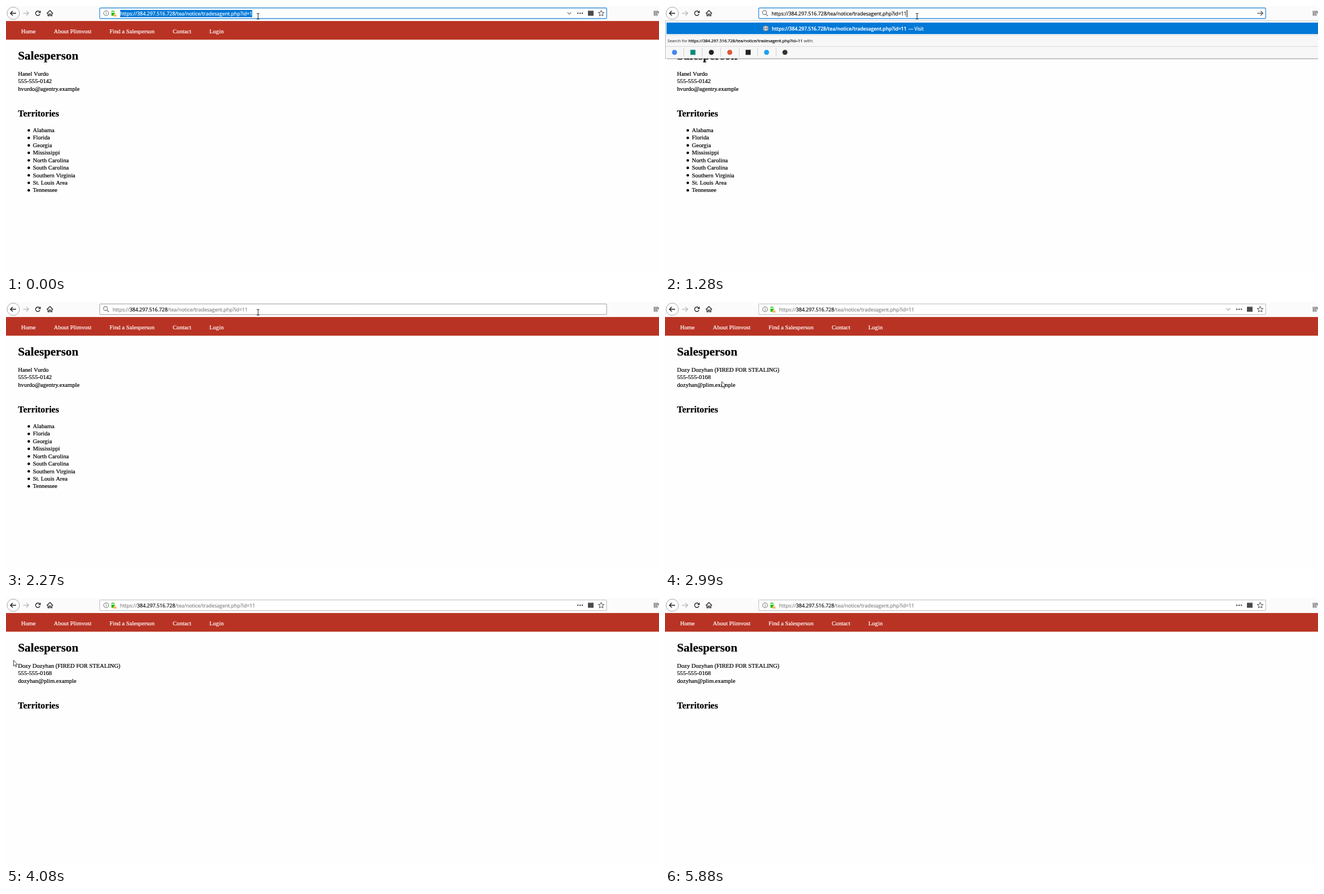
An HTML page with a canvas for the animation above (6.31 s loop, 1167 px wide and 480 px high).

```html
<!DOCTYPE html>
<html lang="en">
<head>
<meta charset="utf-8">
<title>Salesperson page</title>
<style>
html, body { margin: 0; width: 100%; height: 100%; overflow: hidden; background: #fefefe; }
canvas { display: block; width: 1167px; height: 480px; }
</style>
</head>
<body>
<canvas id="stage" width="1167" height="480"></canvas>
<script>
const ctx = document.getElementById('stage').getContext('2d');
const LOOP = 6310;
const SERIF = '"Liberation Serif", serif';
const SANS = '"Open Sans", "Noto Sans", sans-serif';
const BLUE = '#0078d7', INK = '#0c0c0d', GRAY = '#858585', ICON = '#4a4a4f';
const SCHEME = 'https://', HOST = '384.297.516.728', PATH = '/tea/notice/tradesagent.php?id=';
const URL_FONT = `8.9px ${SANS}`;

const NAV = [['Home', 27], ['About Plimvost', 85.5], ['Find a Salesperson', 185], ['Contact', 298], ['Login', 363.5]];
const TERRITORIES = ['Alabama', 'Florida', 'Georgia', 'Mississippi', 'North Carolina',
  'South Carolina', 'Southern Virginia', 'St. Louis Area', 'Tennessee'];
const BEFORE = { lines: ['Hanel Vurdo', '555-555-0142', 'hvurdo@agentry.example'], list: TERRITORIES };
const AFTER = { lines: ['Dozy Dozyhan (FIRED FOR STEALING)', '555-555-0168', 'dozyhan@plim.example'], list: [] };

// Pointer track: start time, shape, x, y (arrow: tip, beam: top centre).
const POINTER = [
  [0, 'beam', 450.5, 13], [2990, 'arrow', 101, 142], [3110, 'beam', 101.5, 143], [3240, 'beam', 100.5, 144],
  [3380, 'beam', 66.5, 139], [3500, 'beam', 23.5, 122], [3630, 'beam', 124.5, 130], [3780, 'beam', 26.5, 126],
  [3920, 'beam', 80.5, 118], [4080, 'arrow', 13, 111], [4200, 'arrow', 95, 137], [4340, 'beam', 97.5, 80],
  [4470, 'arrow', 93, 174], [4890, 'arrow', 261, 201], [5030, 'arrow', 841, 335],
  [5340, 'arrow', 1053, 453], [5610, 'arrow', 1070, 463], [5740, 'arrow', 1080, 468], [5880, 'none', 0, 0]
];

function box(x, y, w, h, color) {
  ctx.fillStyle = color;
  ctx.fillRect(x, y, w, h);
}

// A hairline outline gives small text the weight of desktop rendering.
function write(str, x, y, font, color = '#000') {
  ctx.font = font;
  ctx.fillStyle = ctx.strokeStyle = color;
  ctx.lineWidth = 0.22;
  ctx.fillText(str, x, y);
  ctx.strokeText(str, x, y);
  return x + ctx.measureText(str).width;
}

function trace(points, closed) {
  ctx.beginPath();
  points.forEach(([x, y]) => ctx.lineTo(x, y));
  if (closed) ctx.closePath();
}

function line(points, color = ICON, width = 1.2, closed = false) {
  trace(points, closed);
  ctx.strokeStyle = color;
  ctx.lineWidth = width;
  ctx.stroke();
}

function fill(points, color) {
  trace(points, true);
  ctx.fillStyle = color;
  ctx.fill();
}

function disc(x, y, r, color) {
  ctx.beginPath();
  ctx.arc(x, y, r, 0, 7);
  ctx.fillStyle = color;
  ctx.fill();
}

function ring(x, y, r, color = ICON, width = 1, from = 0, to = Math.PI * 2) {
  ctx.beginPath();
  ctx.arc(x, y, r, from, to);
  ctx.strokeStyle = color;
  ctx.lineWidth = width;
  ctx.stroke();
}

function arrowIcon(x, y, dir, color = ICON, width = 1.3) {
  line([[x - 5 * dir, y], [x + 5 * dir, y]], color, width);
  line([[x + dir, y - 4], [x + 5 * dir, y], [x + dir, y + 4]], color, width);
}

function drawPage({ lines, list }) {
  box(0, 0, 1167, 480, '#fefefe');
  box(0, 26.67, 1167, 33.67, '#b93324');
  const body = `10.67px ${SERIF}`;
  NAV.forEach(([label, x]) => write(label, x, 49, body, '#fff'));
  write('Salesperson', 21.5, 95.6, `bold 21.33px ${SERIF}`);
  lines.forEach((s, i) => write(s, 21.5, 125 + i * 13.4, body));
  write('Territories', 21.5, 197.6, `bold 16px ${SERIF}`);
  list.forEach((s, i) => {
    const y = 226 + i * 13.42;
    disc(40.7, y - 3.2, 2.3, '#000');
    write(s, 48, y, body);
  });
}

function drawToolbar() {
  box(0, 0, 1167, 26.67, '#fbfbfb');
  disc(13, 13, 11, '#fff');
  ring(13, 13, 11, '#a6a6a6');
  arrowIcon(13, 13, -1, '#1c1c1f', 1.5);
  arrowIcon(35.5, 13, 1, '#b4b4b6');
  ring(57, 13, 4, '#2a2a2e', 1.5, 0.4, 5.5);
  fill([[62, 8], [62, 12.5], [57.5, 12.5]], '#2a2a2e');
  line([[73, 13.5], [78.5, 8], [84, 13.5]], '#2a2a2e', 1.4);
  line([[75, 12.5], [75, 17.5], [77.3, 17.5], [77.3, 14.5], [79.7, 14.5], [79.7, 17.5], [82, 17.5], [82, 12.5]], '#2a2a2e', 1.3);
  [1158.5, 1161, 1163.5].forEach(x => line([[x, 8.5], [x, 17.5]], ICON, 1.2));
  line([[1165, 9], [1169, 17.5]], ICON, 1.2);
}

function siteIcons() {
  ring(179, 13, 4.4, '#6a6a6d');
  box(178.5, 12.2, 1, 3.3, '#6a6a6d');
  box(178.5, 10.2, 1, 1.1, '#6a6a6d');
  ring(191.2, 11, 2.2, '#12bc00', 1.3, Math.PI, Math.PI * 2);
  box(188.5, 12, 6.5, 5.5, '#12bc00');
  fill([[194.5, 12], [198.5, 18.7], [190.5, 18.7]], '#fff');
  fill([[194.5, 13], [198, 18.4], [191, 18.4]], '#f5a02a');
  box(194, 14.8, 1, 2, '#fff');
}

function searchIcon() {
  ring(177.8, 11.8, 3.6, '#77777a', 1.2);
  line([[180.4, 14.4], [184, 18]], '#77777a', 1.4);
}

function actionIcons() {
  [1022, 1026, 1030].forEach(x => disc(x, 13, 1.3, ICON));
  box(1040, 8.5, 10, 9, ICON);
  const star = Array.from({ length: 10 }, (_, i) => {
    const a = -Math.PI / 2 + i * Math.PI / 5, r = i % 2 ? 2.5 : 5.6;
    return [1063.7 + r * Math.cos(a), 13.3 + r * Math.sin(a)];
  });
  line(star, ICON, 1, true);
}

function chevron(alpha) {
  ctx.globalAlpha = alpha;
  line([[1003.3, 11.3], [1006.7, 14.7], [1010, 11.3]], '#5a5a5d', 1.1);
  ctx.globalAlpha = 1;
}

function drawField(t) {
  const focused = t < 2270;
  const edge = focused ? '#2f8fda' : t < 2990 ? '#a0a0a0' : '#bdbdbd';
  ctx.beginPath();
  ctx.roundRect(167.5, 3.5, 906, 19, 1.5);
  ctx.fillStyle = '#fff';
  ctx.fill();
  ctx.strokeStyle = edge;
  ctx.lineWidth = focused ? 1.3 : 1;
  ctx.stroke();

  const searching = t >= 1280 && t < 2410;
  const x = searching ? 190.5 : 204;
  if (searching) searchIcon();
  else { siteIcons(); actionIcons(); }
  drawAddress(t, x);

  if (t < 1030) chevron(0.9);
  else if (t < 1280) arrowIcon(1006.5, 13, 1);
  else if (t < 2270) arrowIcon(1063.5, 13, 1);
  else if (t >= 2410 && t < 3240) chevron(t < 2990 ? 0.9 : t < 3110 ? 0.6 : 0.3);
}

function drawAddress(t, x) {
  const base = 16.8;
  const id = t < 1280 ? '1' : '11';
  if (t >= 2270) {
    x = write(SCHEME, x, base, URL_FONT, GRAY);
    x = write(HOST, x, base, URL_FONT, INK);
    write(PATH + id, x, base, URL_FONT, GRAY);
    return;
  }
  const stem = SCHEME + HOST + PATH;
  ctx.font = URL_FONT;
  const mid = x + ctx.measureText(stem).width;
  const end = mid + ctx.measureText(id).width;
  if (t < 1030) {
    const from = t < 310 ? x : Math.round(mid);
    box(from, 7, Math.round(end) - from, 13, BLUE);
  }
  write(stem, x, base, URL_FONT, t < 310 ? '#fff' : INK);
  write(id, mid, base, URL_FONT, t < 1030 ? '#fff' : INK);
  if (t >= 1030 && (t < 1550 || t >= 1990)) box(Math.round(end), 7, 1, 13, '#000');
}

function drawDropdown() {
  const address = SCHEME + HOST + PATH + '11';
  const shade = ctx.createLinearGradient(0, 94, 0, 96);
  shade.addColorStop(0, 'rgba(0,0,0,.35)');
  shade.addColorStop(1, 'rgba(0,0,0,0)');
  box(4, 94, 1163, 2, shade);
  box(0, 26, 1167, 68, '#fcfcfc');
  box(0, 26, 1167, 1, '#c8c8c8');
  box(0, 26, 1, 68, '#b8b8b8');
  box(0, 93.5, 1167, 0.8, '#a0a0a0');
  box(2.67, 29.67, 1164.33, 20.67, BLUE);
  box(1, 52, 1166, 41.5, '#f7f7f7');
  box(1, 52, 1166, 1, '#e0e0e0');
  box(1, 72, 1166, 1, '#d8d8d8');

  disc(180, 40, 5.3, '#dde6ee');
  ring(180, 40, 4.9, '#55636f');
  line([[175.5, 40], [184.5, 40]], '#55636f', 0.8);
  ctx.beginPath();
  ctx.ellipse(180, 40, 2.2, 4.8, 0, 0, 7);
  ctx.stroke();

  const end = write(address, 191, 43.8, `600 8.6px ${SANS}`, '#fff');
  write('— Visit', end + 3.5, 43.8, `8.5px ${SANS}`, '#fff');

  const small = `7.5px ${SANS}`;
  let x = write('Search for ', 4.5, 65, small, '#5c5c5c');
  x = write(address, x, 65, small, INK);
  write(' with:', x, 65, small, '#5c5c5c');

  ['#4285f4', '#00897b', '#222222', '#de5833', '#222222', '#1da1f2', '#333333'].forEach((color, i) => {
    const cx = 17 + i * 32.9;
    if (i === 1 || i === 4) box(cx - 4.5, 78.5, 9, 9, color);
    else disc(cx, 83, 4.5, color);
    if (i < 6) box(Math.round(cx + 16), 75, 1, 16, '#d0d0d0');
  });
}

function drawPointer(t) {
  const [, shape, x, y] = POINTER.findLast(p => p[0] <= t);
  if (shape === 'beam') {
    box(x - 0.5, y, 1, 11, '#222');
    box(x - 2.5, y, 5, 1, '#444');
    box(x - 2.5, y + 10, 5, 1, '#444');
  } else if (shape === 'arrow') {
    const outline = [[0.5, 0.5], [0.5, 10.8], [2.8, 8.7], [4.4, 12.4], [6, 11.7], [4.5, 8.1], [7.6, 8.1]]
      .map(([dx, dy]) => [x + dx, y + dy]);
    fill(outline, '#fff');
    line(outline, '#111', 0.8, true);
  }
}

function draw(t) {
  drawPage(t < 2410 ? BEFORE : AFTER);
  drawToolbar();
  drawField(t);
  if (t >= 1280 && t < 2270) drawDropdown();
  drawPointer(t);
}

function tick() {
  draw(performance.now() % LOOP);
  requestAnimationFrame(tick);
}
tick();
</script>
</body>
</html>
```
